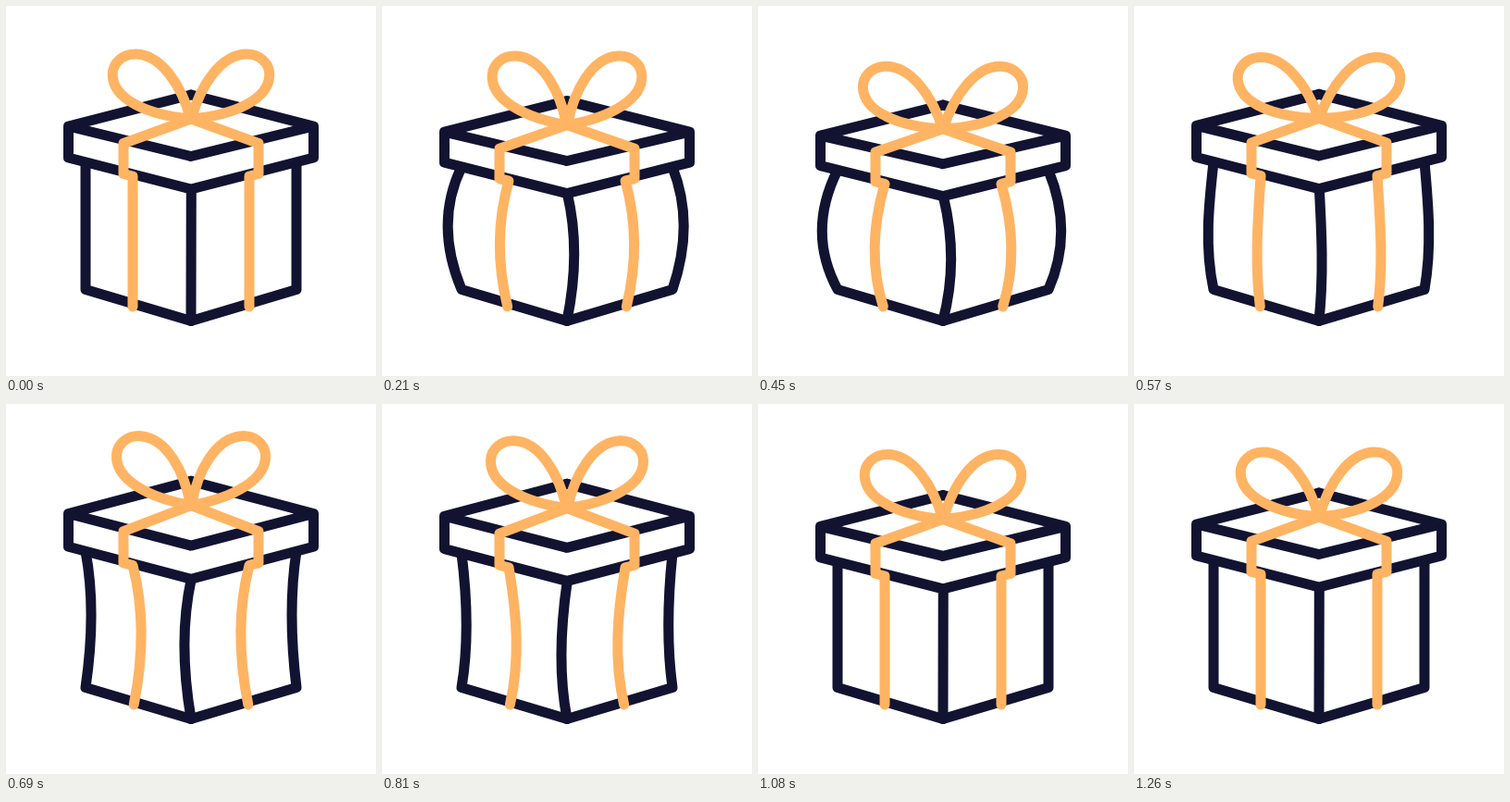
Recreate the animation shown at these times as an HTML page with a canvas. Size 400 by 400 pixels, loop 3.32 s.

```html
<!DOCTYPE html>
<html lang="en">
<head>
<meta charset="utf-8">
<title>Gift box</title>
<style>
html, body { margin: 0; width: 100%; height: 100%; overflow: hidden; background: #fff; }
canvas { display: block; }
</style>
</head>
<body>
<canvas id="stage" width="400" height="400"></canvas>
<script>
const ctx = document.getElementById('stage').getContext('2d');
const LOOP = 3320, STEP = 30, END = 1260;
const NAVY = '#121331', ORANGE = '#ffb463';

// Cosine easing from rest through [time, value] turning points
function swing(...turns) {
  return t => {
    let t0 = 0, v0 = 0;
    for (const [t1, v1] of turns) {
      if (t <= t1) return v0 + (v1 - v0) * (1 - Math.cos(Math.PI * (t - t0) / (t1 - t0))) / 2;
      [t0, v0] = [t1, v1];
    }
    return v0;
  };
}

const lidDrop = swing([400, 11.3], [745, -13], [940, 4], [END, 0]);
const bulge = swing([260, 23.5], [400, 23.5], [720, -10], [930, 0]);
const bowTilt = swing([200, 4.5], [560, -4], [700, 5], [930, 0]);
const LAG = 30; // the lower half of the box follows the upper half

function stroke(d, color, fill) {
  const path = new Path2D(d);
  if (fill) {
    ctx.fillStyle = fill;
    ctx.fill(path);
  }
  ctx.strokeStyle = color;
  ctx.stroke(path);
}

// Runs paint as is and mirrored about the middle of the stage
function bothSides(paint) {
  paint(1);
  ctx.save();
  ctx.transform(-1, 0, 0, 1, 400, 0);
  paint(0.82);
  ctx.restore();
}

// Curve from (x0, y0) to (x1, y1) whose handles are pushed sideways
function bent(x0, y0, x1, y1, high, low) {
  const h = (y1 - y0) / 3;
  return `C${x0 + high} ${y0 + h} ${x1 + low} ${y1 - h} ${x1} ${y1}`;
}

function drawBow(knotY, tilt) {
  ctx.save();
  ctx.translate(199.7, knotY);
  ctx.rotate(tilt * Math.PI / 180);
  stroke('M0 0C-10 -36 -32 -70 -60 -70C-74 -70 -84.5 -60 -84.5 -48C-84.5 -21 -46 -4 0 0', ORANGE);
  ctx.restore();
}

function draw(t) {
  const d = lidDrop(t);
  const high = bulge(t), low = bulge(Math.max(0, t - LAG));
  // Inner lines bend less outwards and more inwards
  const inner = b => b - 0.4 * Math.abs(b);
  const hi = inner(high), lo = inner(low);
  const top = 130 + d, rim = 164 + 0.85 * d, front = 198 + 0.76 * d;
  const hem = 184 + 0.83 * d, knotY = 122 + 1.08 * d;

  ctx.clearRect(0, 0, 400, 400);
  ctx.lineCap = ctx.lineJoin = 'round';
  ctx.lineWidth = 11;

  bothSides(k => stroke(`M86 ${rim + 5}${bent(86, rim + 5, 86, 306.5, -k * high, -k * low)}L200 340.5`, NAVY));
  stroke(`M200.3 ${front}${bent(200.3, front, 200, 340, 0.85 * hi, 0.85 * lo)}`, NAVY);

  bothSides(() => stroke(`M200 ${96 + 1.1 * d}L67.5 ${top}V${rim}L200 ${front}
    M67.5 ${top}L200 ${162.5 + 0.82 * d}`, NAVY, '#fff'));

  bothSides(() => {
    stroke(`M200 ${knotY}L127 ${148.5 + 0.95 * d}V${hem - 2.5}L137 ${hem}
      ${bent(137, hem, 137 - 0.12 * lo, 325, -hi, -lo)}`, ORANGE);
    drawBow(knotY, bowTilt(t));
  });
}

const start = performance.now();
function frame() {
  const t = (performance.now() - start) % LOOP;
  draw(Math.min(END, Math.floor(t / STEP) * STEP));
  requestAnimationFrame(frame);
}
frame();
</script>
</body>
</html>
```
